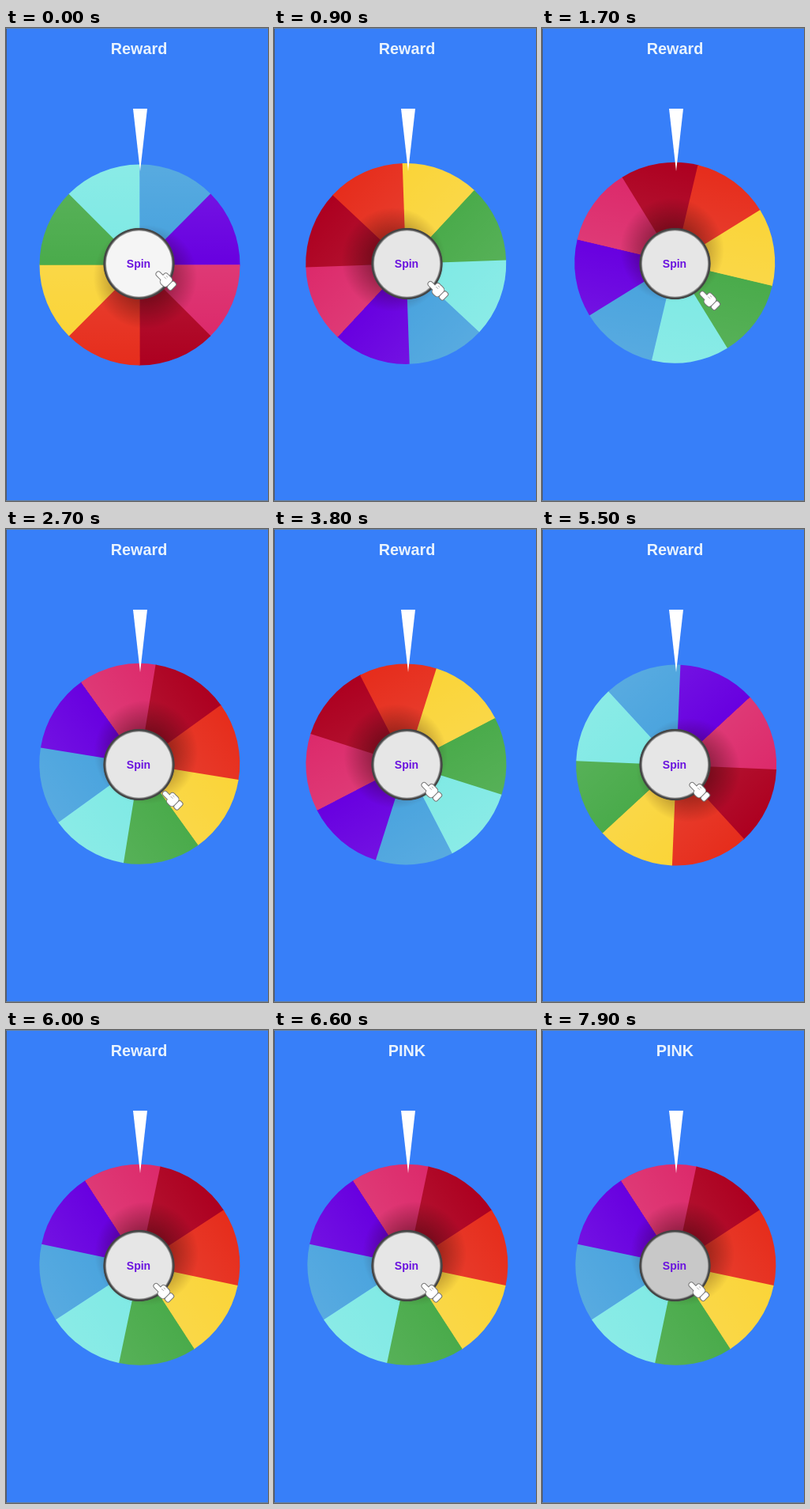
Recreate the animation shown at these times as an HTML page with a canvas. Size 332 by 598 pixels, loop 8 s.

```html
<!DOCTYPE html>
<html lang="en">
<head>
<meta charset="utf-8">
<title>Spin wheel</title>
<style>
html, body { margin: 0; width: 100%; height: 100%; overflow: hidden; background: #377ff9; }
canvas { display: block; }
</style>
</head>
<body>
<canvas id="stage" width="332" height="598"></canvas>
<script>
const ctx = document.getElementById('stage').getContext('2d');
const LOOP = 8000, TAU = Math.PI * 2, RADIUS = 127;
const PIVOT = { x: 168.7, y: 298.2 };
const COLORS = ['#45a1dd', '#6800e0', '#db2366', '#ad0020', '#e62d1c', '#fad332', '#4aab4b', '#7de9e4'];

// Square root of the degrees left to turn: near linear in time means constant braking.
const SPIN = [[750, 101.01], [1700, 82.46], [3800, 41.44], [4500, 28.21], [5500, 8.99], [5968, 0]];
const STOP_ANGLE = -123.1;
const HAND_X = [[500, 190], [1300, 200], [2600, 200], [3400, 187], [7200, 187], [7700, 186]];
const HAND_Y = [[500, 308], [1300, 333], [2600, 333], [3400, 320.5], [7200, 320.5], [7700, 319]];
const SHADE = [[600, 245], [650, 200], [740, 200], [840, 230], [7750, 230], [7850, 200]];

function track(keys, t) {
  if (t <= keys[0][0]) return keys[0][1];
  for (let i = 1; i < keys.length; i++) {
    const [t0, a] = keys[i - 1], [t1, b] = keys[i];
    if (t < t1) return a + (b - a) * (t - t0) / (t1 - t0);
  }
  return keys[keys.length - 1][1];
}

function disc(x, y, r, fill) {
  ctx.beginPath();
  ctx.arc(x, y, r, 0, TAU);
  ctx.fillStyle = fill;
  ctx.fill();
}

function label(text, x, y, size, color) {
  ctx.font = `bold ${size}px "Liberation Sans", Arial, sans-serif`;
  ctx.textAlign = 'center';
  ctx.fillStyle = color;
  ctx.fillText(text, x, y);
}

function gradient(g, stops) {
  stops.forEach(([at, color]) => g.addColorStop(at, color));
  return g;
}

function drawWheel(degrees) {
  ctx.save();
  ctx.translate(PIVOT.x, PIVOT.y);
  ctx.rotate(degrees * Math.PI / 180);
  ctx.translate(0.8, 1.3); // the disc sits slightly off its pivot
  COLORS.forEach((color, i) => {
    const start = i * TAU / 8 - TAU / 4;
    ctx.beginPath();
    ctx.moveTo(0, 0);
    ctx.arc(0, 0, RADIUS, start, start + TAU / 8 + (i < 7 ? 0.01 : 0));
    ctx.fillStyle = color;
    ctx.fill();
  });
  const light = 'rgba(255,255,255,.1)', clear = 'rgba(255,255,255,0)';
  disc(0, 0, RADIUS, gradient(ctx.createLinearGradient(0, -RADIUS, 0, RADIUS),
    [[0, light], [0.5, clear], [0.5, light], [1, clear]]));
  disc(7, 15, 66, gradient(ctx.createRadialGradient(7, 15, 28, 7, 15, 66),
    [[0, 'rgba(40,0,0,.4)'], [1, 'rgba(40,0,0,0)']]));
  ctx.restore();
}

function drawPointer() {
  ctx.beginPath();
  ctx.moveTo(161, 102);
  ctx.lineTo(179, 102);
  ctx.lineTo(170, 181);
  ctx.fillStyle = '#fff';
  ctx.fill();
}

function drawButton(shade) {
  const x = 168.5, y = 298;
  disc(x, y, 45.5, gradient(ctx.createRadialGradient(x, y, 40, x, y, 45.5),
    [[0, '#ddd'], [0.35, '#999'], [0.6, '#444'], [0.85, '#444'], [1, 'rgba(60,60,60,.2)']]));
  disc(x, y, 41.5, `rgb(${shade},${shade},${shade})`);
  label('Spin', 168, 303, 14, '#6a12df');
}

function drawHand(x, y) {
  ctx.save();
  ctx.translate(x + 2, y + 2);
  ctx.rotate(-TAU / 8);
  const shape = new Path2D();
  shape.roundRect(-2.7, -1, 5.4, 15, 2.7);
  shape.roundRect(-6, 9, 14, 11, 4);
  shape.roundRect(1.5, 7, 6.5, 7, 3);
  shape.roundRect(-4, 21, 11, 6, 2);
  ctx.strokeStyle = '#777';
  ctx.lineWidth = 2;
  ctx.stroke(shape);
  ctx.fillStyle = '#fff';
  ctx.fill(shape);
  ctx.beginPath();
  ctx.moveTo(2.6, 9);
  ctx.lineTo(2.6, 13);
  ctx.moveTo(5.4, 10);
  ctx.lineTo(5.4, 13);
  ctx.strokeStyle = '#999';
  ctx.lineWidth = 0.8;
  ctx.stroke();
  ctx.restore();
}

function draw(t) {
  ctx.fillStyle = '#377ff9';
  ctx.fillRect(0, 0, 332, 598);
  ctx.fillStyle = '#4d5a70';
  ctx.fillRect(0, 0, 1, 598);
  ctx.fillStyle = '#67809f';
  ctx.fillRect(0, 0, 332, 1);
  ctx.fillRect(0, 597, 332, 1);

  label(t < 6450 ? 'Reward' : 'PINK', 168.5, 33, 19.8, '#e9f3fd');
  drawWheel(STOP_ANGLE + track(SPIN, t) ** 2);
  drawPointer();
  drawButton(Math.round(track(SHADE, t)));
  drawHand(track(HAND_X, t), track(HAND_Y, t));
}

const began = performance.now();
function tick() {
  draw((performance.now() - began) % LOOP);
  requestAnimationFrame(tick);
}
tick();
</script>
</body>
</html>
```
